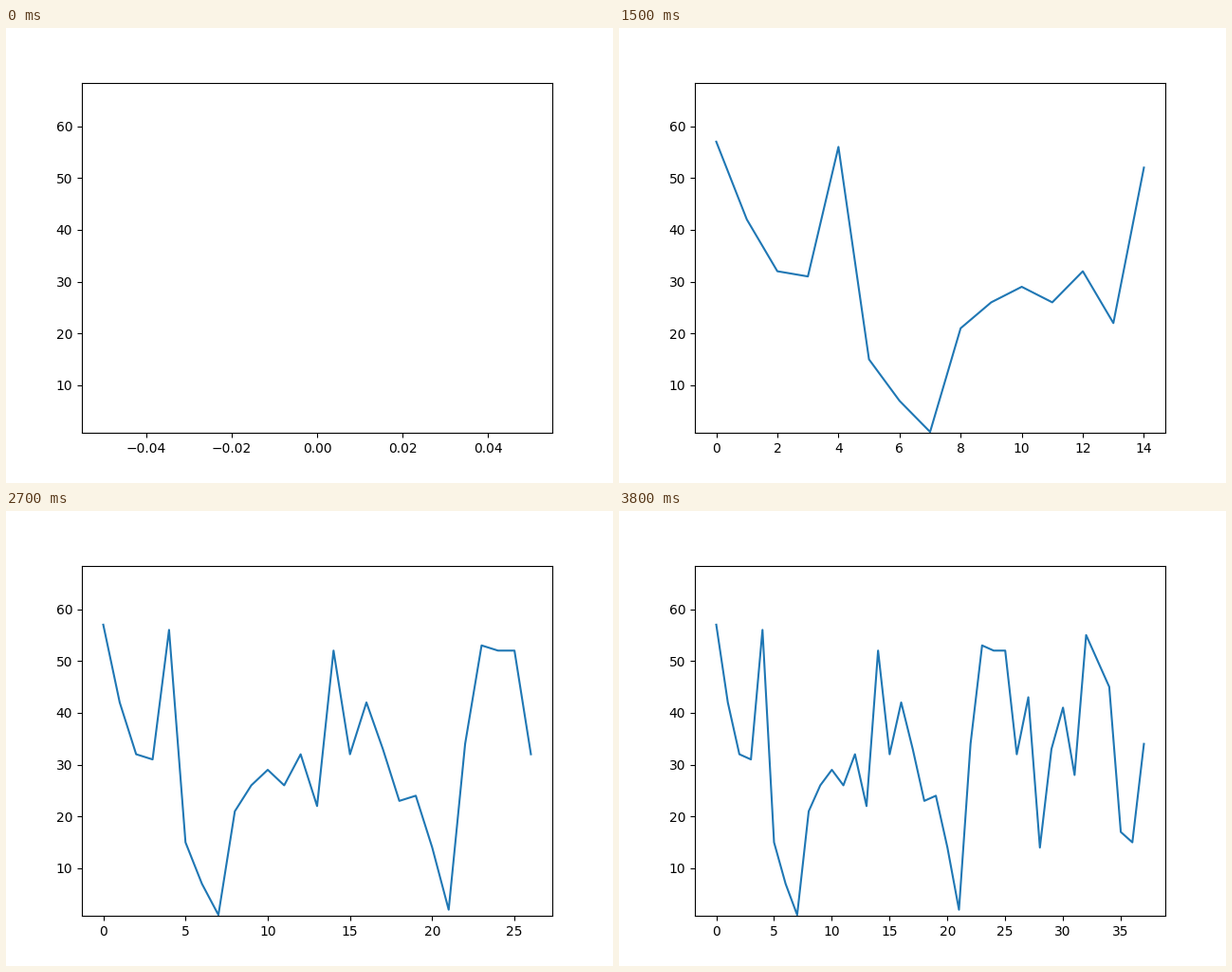
Animation of 640 by 480 pixels, one loop 3.9 s. Source, as a matplotlib script:

```python
import matplotlib.pyplot as plt
from matplotlib.animation import FuncAnimation

VALUES = [57, 42, 32, 31, 56, 15, 7, 1, 21, 26, 29, 26, 32,
          22, 52, 32, 42, 33, 23, 24, 14, 2, 34, 53, 52, 52,
          32, 43, 14, 33, 41, 28, 55, 50, 45, 17, 15, 34]

fig, ax = plt.subplots(figsize=(6.4, 4.8), dpi=100)
line, = ax.plot([], [], color="#1f77b4", lw=1.5)
ax.set_ylim(0.8 * min(VALUES), 1.2 * max(VALUES))


def update(count):
    """Show the first `count` values and fit the x axis to them."""
    line.set_data(range(count), VALUES[:count])
    last = count - 1
    if last > 0:
        ax.set_xlim(-0.05 * last, 1.05 * last)
    else:
        ax.set_xlim(-0.055, 0.055)
    return line,


anim = FuncAnimation(fig, update, frames=len(VALUES) + 1,
                     init_func=lambda: update(0), interval=100, repeat=True)
plt.show()
```
